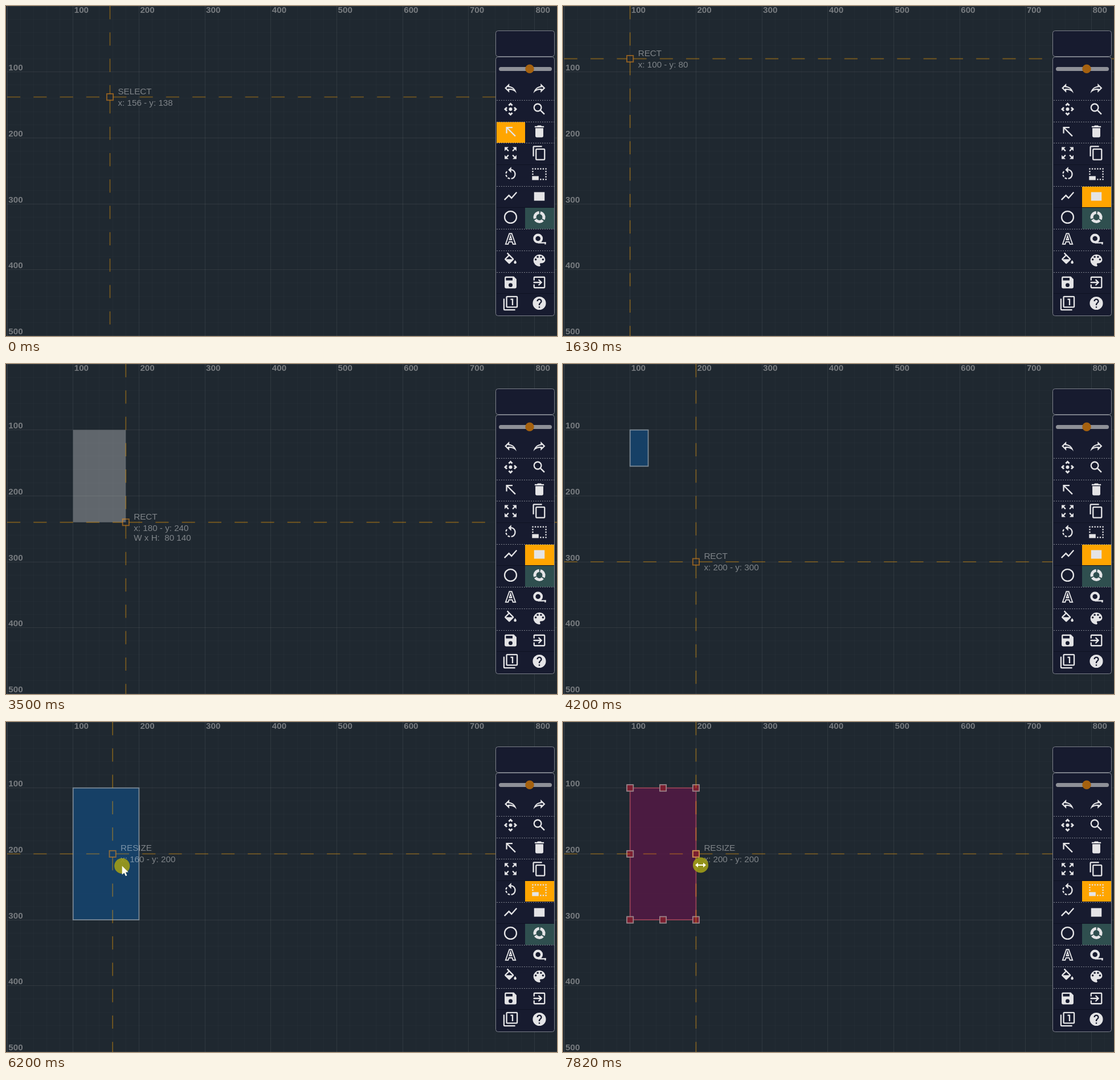
An HTML page with a canvas for the animation above (8 s loop, 967x579 px).

```html
<!DOCTYPE html>
<html lang="en">
<head>
<meta charset="utf-8">
<title>Drawing tool</title>
<style>
html, body { margin: 0; width: 967px; height: 579px; overflow: hidden; background: #1f2830; }
canvas { display: block; }
</style>
</head>
<body>
<canvas id="stage" width="967" height="579"></canvas>
<script>
const ctx = document.getElementById('stage').getContext('2d');
const W = 967, H = 579, LOOP = 8000, UNIT = 1.157;
const SANS = '"Liberation Sans", Arial, sans-serif';
const LIGHT = '#e4e4e6', ORANGE = '#ffa500', PANEL = '#171b2f';
const px = u => 2 + u * UNIT;
const py = u => u * UNIT;

// Pointer positions in grid units: [time, x, y]
const moves = [[0, 156, 138]];
function glide(t0, t1, n, x, y, snap) {
  const [, x0, y0] = moves[moves.length - 1];
  for (let i = 1; i <= n; i++) {
    const t = n > 1 ? t0 + (t1 - t0) * (i - 1) / (n - 1) : t0;
    const mix = (a, b) => Math.round((a + (b - a) * i / n) / snap) * snap;
    moves.push([t, mix(x0, x), mix(y0, y)]);
  }
}
glide(1010, 1080, 2, 120, 120, 20);
glide(1480, 1480, 1, 100, 100, 20);
glide(1630, 1630, 1, 100, 80, 20);
glide(2560, 2560, 1, 100, 100, 20);
glide(3270, 3498, 4, 180, 240, 20);
glide(3574, 3650, 2, 200, 280, 20);
glide(3800, 3800, 1, 200, 300, 20);
glide(5580, 5970, 6, 160, 200, 5);
glide(6820, 7360, 8, 200, 200, 5);

const ROWS = [144, 181, 220, 258, 295, 333.5, 370.5, 408.5, 446.5, 485, 521.5];
const COLS = [885.5, 936];
const REPLY = 'M10 9V5l-7 7 7 7v-4.1c5 0 8.5 1.6 11 5.1-1-5-4-10-11-11zM8 9.8 5.8 12 8 14.2V12.9h2c2.5 0 4.7.4 6.6 1.2-1.6-1.7-3.8-2.8-6.8-3.2L8 10.7z';

function ring(r, w, from = 0, to = Math.PI * 2, x = 12, y = 12) {
  ctx.lineWidth = w;
  ctx.beginPath();
  ctx.arc(x, y, r, from, to);
  ctx.stroke();
}
function dot(x, y, r) {
  ctx.beginPath();
  ctx.arc(x, y, r, 0, Math.PI * 2);
  ctx.fill();
}
function box(x0, y0, x1, y1, color) {
  ctx.fillStyle = color;
  ctx.fillRect(x0, y0, x1 - x0, y1 - y0);
}

// Icons on a 24 by 24 grid, left and right column in turn
const icons = [
  REPLY,
  () => { ctx.translate(24, 0); ctx.scale(-1, 1); ctx.fill(new Path2D(REPLY), 'evenodd'); },
  'M15.54 5.54 13.77 7.3 12 5.54 10.23 7.3 8.46 5.54 12 2zm2.92 10-1.76-1.77L18.46 12l-1.76-1.77 1.76-1.77L22 12zm-10 2.92 1.77-1.76L12 18.46l1.77-1.76 1.77 1.76L12 22zm-2.92-10 1.76 1.77L5.54 12l1.76 1.77-1.76 1.77L2 12zM9.4 12a2.6 2.6 0 1 0 5.2 0 2.6 2.6 0 0 0-5.2 0z',
  () => { ring(5.5, 2, 0, Math.PI * 2, 9.5, 9.5); ctx.fill(new Path2D('M13.2 14.6l1.4-1.4.9.8 5 5-1.5 1.5-5-5z')); },
  'M5 15h2V8.41L18.59 20 20 18.59 8.41 7H15V5H5z',
  'M6 19c0 1.1.9 2 2 2h8c1.1 0 2-.9 2-2V7H6zM19 4h-3.5l-1-1h-5l-1 1H5v2h14z',
  () => {
    for (let i = 0; i < 4; i++) {
      ctx.fill(new Path2D('M15 3l2.3 2.3-2.89 2.87 1.42 1.42L18.7 6.7 21 9V3z'));
      ctx.translate(12, 12); ctx.rotate(Math.PI / 2); ctx.translate(-12, -12);
    }
  },
  'M16 1H4a2 2 0 0 0-2 2v14h2V3h12zm3 4H8a2 2 0 0 0-2 2v14a2 2 0 0 0 2 2h11a2 2 0 0 0 2-2V7a2 2 0 0 0-2-2zm0 16H8V7h11z',
  () => {
    const r = 6.95, q = Math.PI / 4;
    for (let i = 2; i < 5; i++) ring(r, 2, q * i + .14, q * (i + 1) - .14);
    ring(r, 2, -Math.PI / 2 + .14, Math.PI / 2 - .14);
    ctx.fill(new Path2D('M13 1 8.45 5.55 13 10z'));
  },
  () => {
    for (let x = 1; x < 23; x += 4) {
      ctx.fillRect(x, 3, 2, 2);
      if (x > 11) ctx.fillRect(x, 19, 2, 2);
    }
    for (let y = 7; y < 18; y += 4) {
      ctx.fillRect(21, y, 2, 2);
      if (y < 15) ctx.fillRect(1, y, 2, 2);
    }
    ctx.fillRect(1, 15, 10, 6);
  },
  'M3.5 18.49l6-6.01 4 4L22 6.92l-1.41-1.41-7.09 7.97-4-4L2 16.99z',
  'M4 6v13h16V6z',
  () => ring(9, 2),
  () => {
    for (let i = 0; i < 3; i++) {
      const a = (-85 + 120 * i) * Math.PI / 180;
      ring(6.9, 4.4, a + .12, a + Math.PI * 2 / 3 - .12);
    }
  },
  () => {
    ctx.lineWidth = 1.6;
    ctx.stroke(new Path2D('M10.2 4h3.6l5.7 16h-3.9l-1.2-3.5H9.6L8.4 20H4.5zM12 7.7l-1.7 5.6h3.4z'));
  },
  () => {
    ring(5.5, 3.6, 0, Math.PI * 2, 10, 11.5);
    ctx.fillRect(10, 17, 12, 2);
    ctx.fillRect(20, 17, 2, 3.5);
  },
  'M16.56 8.94 7.62 0 6.21 1.41l2.38 2.38-5.15 5.15a1.5 1.5 0 0 0 0 2.12l5.5 5.5a1.5 1.5 0 0 0 2.12 0l5.5-5.5a1.5 1.5 0 0 0 0-2.12zM5.21 10 10 5.21 14.79 10zM19 11.5s-2 2.17-2 3.5a2 2 0 0 0 4 0c0-1.33-2-3.5-2-3.5z',
  () => {
    ctx.fill(new Path2D('M12 3a9 9 0 0 0 0 18c.83 0 1.5-.67 1.5-1.5 0-.39-.15-.74-.39-1.01-.23-.26-.38-.61-.38-.99 0-.83.67-1.5 1.5-1.5H16c2.76 0 5-2.24 5-5 0-4.42-4.03-8-9-8z'));
    ctx.fillStyle = PANEL;
    for (const s of [-1, 1]) { dot(12 + s * 5.5, 10.5, 1.5); dot(12 + s * 2.5, 6.5, 1.5); }
  },
  'M17 3H5a2 2 0 0 0-2 2v14a2 2 0 0 0 2 2h14a2 2 0 0 0 2-2V7zm-5 16a3 3 0 1 1 0-6 3 3 0 0 1 0 6zm3-10H5V5h10z',
  'M10.09 15.59 11.5 17l5-5-5-5-1.41 1.41L12.67 11H3v2h9.67zM19 3H5a2 2 0 0 0-2 2v4h2V5h14v14H5v-4H3v4a2 2 0 0 0 2 2h14a2 2 0 0 0 2-2V5a2 2 0 0 0-2-2z',
  'M3 5H1v16a2 2 0 0 0 2 2h16v-2H3zm11 10h2V5h-4v2h2zm7-14H7a2 2 0 0 0-2 2v14a2 2 0 0 0 2 2h14a2 2 0 0 0 2-2V3a2 2 0 0 0-2-2zm0 16H7V3h14z',
  'M12 2a10 10 0 1 0 0 20 10 10 0 0 0 0-20zm1 17h-2v-2h2zm2.07-7.75-.9.92C13.45 12.9 13 13.5 13 15h-2v-.5c0-1.1.45-2.1 1.17-2.83l1.24-1.26c.37-.36.59-.86.59-1.41a2 2 0 1 0-4 0H8a4 4 0 1 1 8 0c0 .88-.36 1.68-.93 2.25z'
];

function drawIcon(icon, i) {
  ctx.save();
  ctx.translate(COLS[i % 2], ROWS[i >> 1]);
  ctx.scale(UNIT, UNIT);
  ctx.translate(-12, -12);
  ctx.fillStyle = ctx.strokeStyle = LIGHT;
  if (typeof icon === 'string') ctx.fill(new Path2D(icon), 'evenodd');
  else icon();
  ctx.restore();
}

function line(x0, y0, x1, y1) {
  ctx.beginPath();
  ctx.moveTo(x0, y0);
  ctx.lineTo(x1, y1);
  ctx.stroke();
}

function drawGrid() {
  box(0, 0, W, H, '#1f2830');
  ctx.lineWidth = 1;
  for (let u = 0; u < 840; u += 20) {
    ctx.strokeStyle = u % 100 ? 'rgba(255,255,255,.018)' : 'rgba(255,255,255,.075)';
    const x = Math.floor(px(u)) + .5, y = Math.floor(py(u)) + .5;
    line(x, 0, x, H);
    if (y < H) line(2, y, W, y);
  }
  box(0, 0, 1, H, '#151a20');
  box(1, 0, 2, H, '#333b43');
}

function drawRulers() {
  ctx.fillStyle = '#777b7f';
  ctx.font = 'bold 15.2px ' + SANS;
  for (let u = 100; u <= 800; u += 100) {
    ctx.fillText(u, px(u) + 2, 11.5);
    if (u <= 500) ctx.fillText(u, 4.3, py(u) - 2.5);
  }
}

function drawShape(t, x, y) {
  const left = px(100), top = py(100);
  if (t >= 3270 && t < 4200) {
    box(left, top, px(x), py(y), 'rgba(255,255,255,.29)');
    return;
  }
  if (t < 4200) return;
  const step = Math.min(3, Math.floor((t - 4200) / 76.6));
  const grow = .275 + .725 * step / 3;
  const picked = t >= 6270;
  const w = 100 * UNIT * grow, h = 200 * UNIT * grow;
  ctx.fillStyle = picked ? 'rgba(88,24,70,.78)' : 'rgba(20,72,120,.76)';
  ctx.fillRect(left, top, w, h);
  ctx.strokeStyle = picked ? '#974356' : '#7b8894';
  ctx.lineWidth = 1.8;
  ctx.strokeRect(left, top, w, h);
  if (!picked) return;
  for (let i = 0; i < 9; i++) {
    if (i === 4) continue;
    const hx = px(100 + 50 * (i % 3)) - 5.6, hy = py(100 + 100 * Math.floor(i / 3)) - 5.6;
    ctx.fillStyle = '#7c1f30';
    ctx.fillRect(hx, hy, 11.2, 11.2);
    ctx.strokeStyle = '#9c8389';
    ctx.strokeRect(hx, hy, 11.2, 11.2);
  }
}

function drawCross(t, x, y) {
  const cx = px(x), cy = py(y), r = 5.8;
  ctx.strokeStyle = 'rgba(255,165,0,.36)';
  ctx.lineWidth = 1.9;
  ctx.setLineDash([20 * UNIT, 20 * UNIT]);
  line(2, cy, cx - r, cy);
  line(cx + r, cy, W, cy);
  line(cx, 0, cx, cy - r);
  line(cx, cy + r, cx, H);
  ctx.setLineDash([]);
  ctx.strokeStyle = 'rgba(255,150,20,.5)';
  ctx.strokeRect(cx - 5.6, cy - 5.6, 11.2, 11.2);

  ctx.fillStyle = 'rgba(255,255,255,.43)';
  ctx.font = '15.2px ' + SANS;
  const mode = t < 460 ? 'SELECT' : t < 5120 ? 'RECT' : 'RESIZE';
  ctx.fillText(mode, cx + 14, cy - 5);
  ctx.fillText(`x: ${x} - y: ${y}`, cx + 14, cy + 15);
  if (t >= 3270 && t < 4200) ctx.fillText(`W x H:  ${x - 100} ${y - 100}`, cx + 14, cy + 32);
}

function panel(y, h) {
  ctx.beginPath();
  ctx.roundRect(859.5, y, 103, h, 4);
  ctx.fillStyle = PANEL;
  ctx.fill();
  ctx.strokeStyle = '#7b7f89';
  ctx.lineWidth = 1;
  ctx.stroke();
}

function drawTools(t) {
  panel(43.5, 45);
  panel(89.5, 454);
  ctx.fillStyle = '#8e9097';
  ctx.beginPath();
  ctx.roundRect(865, 107, 93, 7, 3.5);
  ctx.fill();
  ctx.fillStyle = '#a5610f';
  dot(919, 110.3, 7.7);

  box(911, 354, 962, 391, '#2f4f4f');
  if (t < 460) box(861, 203.5, 911, 240, ORANGE);
  else if (t < 5120) box(911, 317, 962, 353, ORANGE);
  else box(911, 278.5, 962, 315, ORANGE);

  const lines = [165, 203, 240, 278, 316, 353, 391, 429, 467, 504];
  lines.forEach((y, i) => {
    const faint = i === 3 || i === 5 || i === 9;
    ctx.strokeStyle = faint ? '#0f1323' : '#7e828c';
    ctx.lineWidth = 1;
    ctx.setLineDash(faint ? [] : [2, 2]);
    line(861, y + .5, 962, y + .5);
  });
  ctx.setLineDash([]);
  icons.forEach(drawIcon);
}

function drawPress(t) {
  const arrow = t >= 6200 && t < 6270;
  if (!arrow && t < 7820) return;
  const x = arrow ? 203.7 : 241.5, y = arrow ? 252.5 : 251;
  ctx.fillStyle = 'rgba(158,156,24,.9)';
  dot(x, y, 13.6);
  ctx.save();
  ctx.translate(x, y);
  ctx.fillStyle = '#fffef0';
  ctx.fill(new Path2D(arrow
    ? 'M0 0V15.5L3.7 12 6.3 17.8 8.7 16.7 6.2 11H11z'
    : 'M-9.5 0l5-4.2V-1h9v-3.2l5 4.2-5 4.2V1h-9v3.2z'));
  ctx.restore();
}

function draw(t) {
  let pos = moves[0];
  for (const m of moves) if (m[0] <= t) pos = m;
  const [, x, y] = pos;
  drawGrid();
  drawRulers();
  drawShape(t, x, y);
  drawCross(t, x, y);
  drawTools(t);
  drawPress(t);
}

const start = performance.now();
function tick() {
  draw((performance.now() - start) % LOOP);
  requestAnimationFrame(tick);
}
tick();
</script>
</body>
</html>
```
